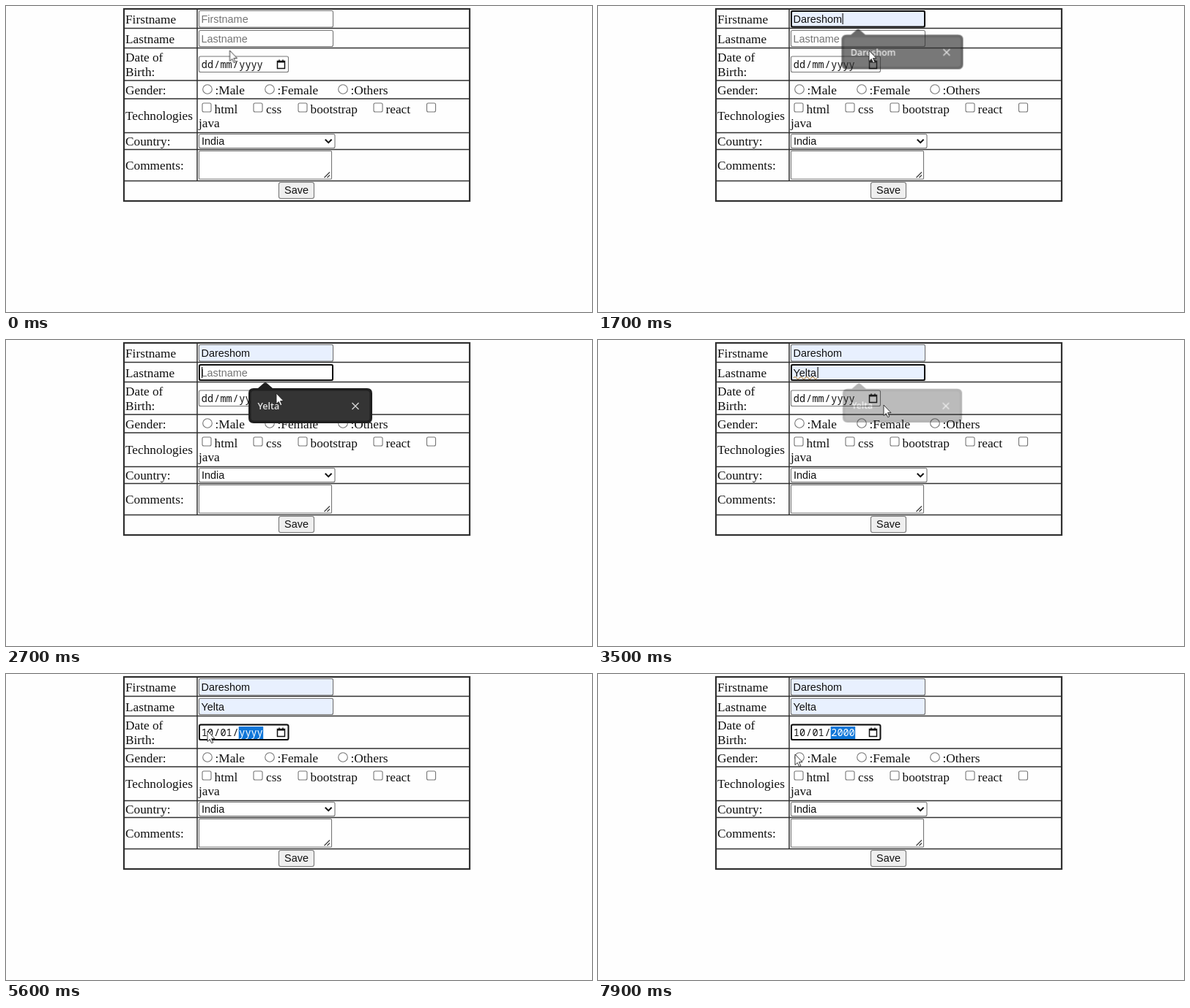
Animation, 800 px wide and 419 px high, one loop 8 s. Source, as an HTML page:

```html
<!DOCTYPE html>
<html lang="en">
<head>
<meta charset="utf-8">
<title>Registration form</title>
<style>
  html, body { margin: 0; width: 100%; height: 100%; overflow: hidden; background: #fefefe; }
  svg { display: block; width: 800px; height: 419px; }

  text { font: 14.45px Arial, "Liberation Sans", sans-serif; fill: #111; white-space: pre; }
  .label text { font: 17.3px "Times New Roman", "Liberation Serif", serif; }
  .hint { fill: #757575; }
  .date text { font: 13.5px "Noto Sans Mono", monospace; }
  .popup text { font: 600 12.6px "Open Sans", "Noto Sans", sans-serif; fill: #e3e3e3; }

  .grid { fill: none; stroke: #303030; stroke-width: 1.5; }
  .box { fill: #fff; stroke: #767676; stroke-width: 1.1; }
  .auto { fill: #e8f0fe; stroke: #767676; stroke-width: 1.1; }
  .ring { fill: none; stroke: #101010; stroke-width: 2; }

  /* Everything below shares one 8 s loop; 1% is 80 ms. */
  .steps { animation: 8s step-end infinite; opacity: 0; }
  .ring1 { animation-name: ring1; }
  .ring2 { animation-name: ring2; }
  .ring3 { animation-name: ring3; }
  .fill1 { animation-name: hover1; }
  .fill2 { animation-name: fill2; }
  .spell { animation-name: spell; }
  .hover1 { animation-name: hover1; }
  .hover2 { animation-name: hover2; }
  .caret { animation-name: caret; }
  .arrow { animation-name: arrow; }
  .beam { animation-name: beam; }
  .popup { opacity: 0; transform-box: fill-box; transform-origin: center; animation: 8s linear infinite; }
  .popup1 { animation-name: popup1; }
  .popup2 { animation-name: popup2; }
  .pointer { animation: pointer 8s ease-in-out infinite; }

  @keyframes ring1 { 0%, 28.75%, 100% { opacity: 0 } 6.25% { opacity: 1 } }
  @keyframes ring2 { 0%, 53.75%, 100% { opacity: 0 } 28.75% { opacity: 1 } }
  @keyframes ring3 { 0% { opacity: 0 } 53.75%, 100% { opacity: 1 } }
  @keyframes hover1 { 0% { opacity: 0 } 15%, 100% { opacity: 1 } }
  @keyframes hover2 { 0% { opacity: 0 } 33.1%, 100% { opacity: 1 } }
  @keyframes fill2 { 0% { opacity: 0 } 35%, 100% { opacity: 1 } }
  @keyframes spell { 0%, 53.75%, 100% { opacity: 0 } 41.25% { opacity: 1 } }
  @keyframes arrow { 0%, 13%, 32.75%, 100% { opacity: 1 } 1%, 25.2% { opacity: 0 } }
  @keyframes beam { 0%, 13%, 32.75%, 100% { opacity: 0 } 1%, 25.2% { opacity: 1 } }

  @keyframes caret {
    0%, 100% { opacity: 0; transform: translate(267px, 10px) }
    6.25% { opacity: 1; transform: translate(267px, 10px) }
    12.5% { opacity: 0; transform: translate(267px, 10px) }
    20% { opacity: 1; transform: translate(333.5px, 10px) }
    26.25% { opacity: 0; transform: translate(333.5px, 10px) }
    28.75% { opacity: 1; transform: translate(267px, 37px) }
    35% { opacity: 0; transform: translate(267px, 37px) }
    41.25% { opacity: 1; transform: translate(299.5px, 37px) }
    47.5% { opacity: 0; transform: translate(299.5px, 37px) }
  }
  @keyframes popup1 {
    0%, 6.9% { opacity: 0; transform: scale(.947) }
    8.1%, 20% { opacity: 1; transform: none }
    23.75%, 100% { opacity: 0; transform: scale(.947) }
  }
  @keyframes popup2 {
    0%, 29.4% { opacity: 0; transform: scale(.947) }
    30.6%, 41.25% { opacity: 1; transform: none }
    45%, 100% { opacity: 0; transform: scale(.947) }
  }
  @keyframes pointer {
    0% { transform: translate(305.5px, 61px); animation-timing-function: linear }
    5%, 11.25% { transform: translate(300px, 21px) }
    17.5%, 23.75% { transform: translate(370px, 61px) }
    28.1%, 31.25% { transform: translate(368px, 45px); animation-timing-function: linear }
    33.75% { transform: translate(369px, 73px) }
    37.5%, 41.25% { transform: translate(380px, 86px) }
    43.75%, 46.25% { transform: translate(390px, 89px) }
    51.9%, 92.5% { transform: translate(275px, 78px) }
    98.75%, 100% { transform: translate(269px, 110px) }
  }
</style>
</head>
<body>
<svg viewBox="0 0 800 419">
  <defs>
    <path id="bubble" fill="#1f1f1f" d="M338 39H344L352 32Q354 30.500 356 32L364 39H493Q500 39 500 46V80Q500 87 493 87H338Q331 87 331 80V46Q331 39 338 39Z"/>
    <g id="active">
      <rect x="334.500" y="42.500" width="162" height="41" rx="4" fill="#343434"/>
      <path d="M472.500 59l9 9m0-9l-9 9" stroke="#d5d5d5" stroke-width="1.4"/>
    </g>
    <circle id="radio" class="box" r="6.300"/>
    <rect id="check" class="box" x="-6" y="-6" width="12" height="12" rx="2"/>
  </defs>

  <g class="grid">
    <rect x="161" y="4" width="472" height="263" stroke-width="2.2"/>
    <path d="M161 30.500H633M161 57.500H633M161 102H633M161 127H633M161 173.500H633M161 196.500H633M161 239.500H633M261 4V239.500"/>
  </g>

  <g class="label">
    <text x="163" y="24">Firstname</text>
    <text x="163" y="50.500">Lastname</text>
    <text x="163" y="76">Date of</text>
    <text x="163" y="96">Birth:</text>
    <text x="163" y="120.500">Gender:</text>
    <text x="163" y="156">Technologies</text>
    <text x="163" y="190.500">Country:</text>
    <text x="163" y="223.500">Comments:</text>
    <text x="285.500" y="121">:Male</text>
    <text x="370.500" y="121">:Female</text>
    <text x="470.500" y="121">:Others</text>
    <text x="284.500" y="147">html</text>
    <text x="355" y="147">css</text>
    <text x="415.500" y="147">bootstrap</text>
    <text x="518.500" y="147">react</text>
    <text x="263" y="166">java</text>
  </g>

  <use href="#radio" x="275" y="114"/>
  <use href="#radio" x="360" y="114"/>
  <use href="#radio" x="460" y="114"/>
  <use href="#check" x="274" y="139"/>
  <use href="#check" x="344" y="139"/>
  <use href="#check" x="405" y="139"/>
  <use href="#check" x="508" y="139"/>
  <use href="#check" x="580.500" y="139"/>

  <rect class="box" x="263.500" y="6.500" width="183" height="22.500" rx="2"/>
  <text class="hint" x="266.500" y="22.800">Firstname</text>
  <g class="steps fill1">
    <rect class="auto" x="263.500" y="6.500" width="183" height="22.500" rx="2"/>
    <text x="266.500" y="22.800">Dareshom</text>
  </g>
  <rect class="steps ring ring1" x="264" y="7" width="182" height="21.500" rx="2"/>

  <rect class="box" x="263.500" y="33.500" width="183" height="22" rx="2"/>
  <text class="hint" x="266.500" y="49.500">Lastname</text>
  <g class="steps fill2">
    <rect class="auto" x="263.500" y="33.500" width="183" height="22" rx="2"/>
    <text x="266.500" y="49.500">Yelta</text>
  </g>
  <path class="steps spell" d="M267 52q2-3 4 0t4 0 4 0 4 0 4 0 4 0 4 0 4 0" fill="none" stroke="#b98a45" stroke-width="1.2"/>
  <rect class="steps ring ring2" x="264" y="34" width="182" height="21" rx="2"/>

  <rect class="box" x="263.500" y="69" width="122" height="21.500" rx="2"/>
  <rect class="steps ring ring3" x="264" y="69.500" width="121.500" height="20.500" rx="2"/>
  <rect id="mark" y="72" height="17" fill="#0f76d8"/>
  <g class="date">
    <text class="part" x="266.800" y="85">dd</text>
    <text x="284" y="85">/</text>
    <text class="part" x="292.500" y="85">mm</text>
    <text x="309.500" y="85">/</text>
    <text class="part" x="318.300" y="85">yyyy</text>
  </g>
  <path d="M370.500 75.500H380.500V85.500H370.500ZM370.500 76.800H380.500M373 73.500V76M378 73.500V76" fill="none" stroke="#111" stroke-width="1.5"/>

  <rect class="box" x="263.500" y="175.500" width="185.500" height="19" rx="2"/>
  <text x="267" y="190">India</text>
  <path d="M435.800 182.800l4.400 4.400 4.400-4.400" fill="none" stroke="#111" stroke-width="2"/>

  <rect class="box" x="263.500" y="198.500" width="181" height="38.500" rx="1"/>
  <path d="M434.500 235l7.500-7.500M438.500 235l3.500-3.500" stroke="#444" stroke-width="1.3"/>

  <rect class="box" x="372.500" y="241.500" width="48" height="22" rx="2.500" style="fill:#efefef"/>
  <text x="396.500" y="257" text-anchor="middle">Save</text>

  <rect class="steps caret" width="1.200" height="15" fill="#111"/>

  <g class="popup popup1">
    <use href="#bubble"/>
    <use class="steps hover1" href="#active"/>
    <text x="343.500" y="68">Dareshom</text>
  </g>
  <g transform="translate(0 27)">
    <g class="popup popup2">
      <use href="#bubble"/>
      <use class="steps hover2" href="#active"/>
      <text x="343.500" y="68">Yelta</text>
    </g>
  </g>

  <g class="pointer">
    <path class="steps arrow" d="M0 0V14.500L3.300 11.500 5.700 16.700 7.800 15.700 5.500 10.600H10Z" fill="#fff" stroke="#222" stroke-width=".9"/>
    <path class="steps beam" d="M-3-6.500Q0-6.500 0-5Q0-6.500 3-6.500M0-5V6M-3 7.500Q0 7.500 0 6Q0 7.500 3 7.500" fill="none" stroke="#222" stroke-width="1.2"/>
  </g>
</svg>
<script>
  const LOOP = 8000;
  // time, day, month, year, selected part (-1 for none)
  const typing = [
    [0, "dd", "mm", "yyyy", -1],
    [4300, "dd", "mm", "yyyy", 0],
    [4800, "01", "mm", "yyyy", 0],
    [5000, "10", "mm", "yyyy", 1],
    [5200, "10", "00", "yyyy", 1],
    [5400, "10", "01", "yyyy", 2],
    [6000, "10", "01", "0002", 2],
    [6300, "10", "01", "0020", 2],
    [6600, "10", "01", "0200", 2],
    [6900, "10", "01", "2000", 2]
  ];
  const marks = [[266, 18], [291.7, 18], [317.7, 33.5]];
  const parts = document.querySelectorAll(".part");
  const mark = document.getElementById("mark");
  let start, shown;

  function draw(now) {
    start ??= now;
    const t = (now - start) % LOOP;
    const step = typing.findLast(s => s[0] <= t);
    if (step !== shown) {
      shown = step;
      const selected = step[4];
      parts.forEach((part, i) => {
        part.textContent = step[i + 1];
        part.style.fill = i === selected ? "#fff" : "#111";
      });
      const [x, width] = marks[selected] || [0, 0];
      mark.setAttribute("x", x);
      mark.setAttribute("width", width);
    }
    requestAnimationFrame(draw);
  }
  requestAnimationFrame(draw);
</script>
</body>
</html>
```
